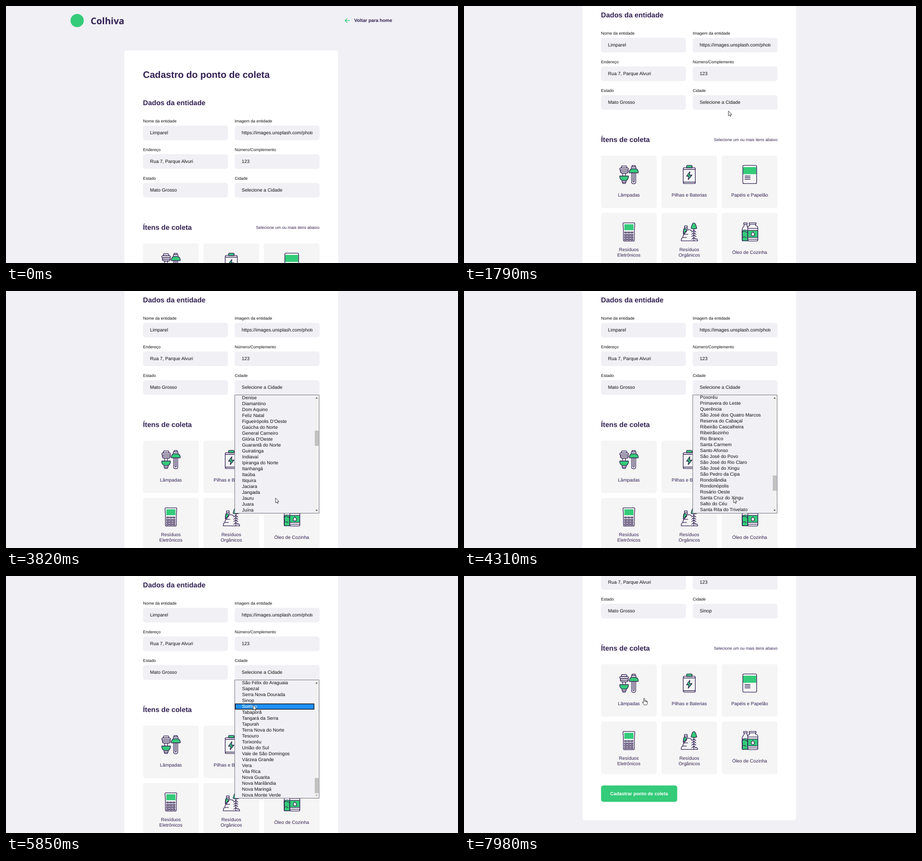
Recreate the animation shown at these times as an HTML page. Size 991 by 565 pixels, loop 8 s.

```html
<!DOCTYPE html>
<html lang="pt-BR">
<head>
<meta charset="utf-8">
<title>Cadastro do ponto de coleta</title>
<style>
  html, body { margin: 0; width: 100%; height: 100%; overflow: hidden; background: #f0f0f5; }
  #stage { display: block; width: 991px; height: 565px; font: 10.29px "Liberation Sans", Arial, sans-serif; text-rendering: geometricPrecision; }
  .title { font-size: 20.58px; font-weight: bold; }
  .head { font-size: 15.43px; font-weight: bold; }
  .small { font-size: 9px; }
  .bold { font-weight: bold; }
  .brand { font: bold 20px "Noto Sans", sans-serif; }
  .ink { fill: #322153; }
  .icon { fill: none; stroke: #322153; stroke-width: 1.35; stroke-linejoin: round; stroke-linecap: round; }
  .icon .g { fill: #34cb79; }
  .icon .w { fill: #f5f5f5; }
  .mid { text-anchor: middle; }
</style>
</head>
<body>
<svg id="stage" viewBox="0 0 991 565">
  <rect width="991" height="565" fill="#f0f0f5"/>
  <g id="page">
    <circle cx="156" cy="32" r="14.5" fill="#34cb79"/>
    <g class="ink">
      <text class="brand" x="185.5" y="40">Colhiva</text>
      <text class="bold" x="763.5" y="35">Voltar para home</text>
    </g>
    <path d="M753.5 32H743.5M748 27.3L743.3 32L748 36.7" fill="none" stroke="#34cb79" stroke-width="1.3"/>
    <rect x="259.5" y="97.5" width="468.5" height="767.5" rx="5" fill="#fff"/>
    <g class="ink">
      <text class="title" x="300.3" y="158">Cadastro do ponto de coleta</text>
      <text class="head" x="300.3" y="218">Dados da entidade</text>
      <text class="head" x="300.3" y="492">Ítens de coleta</text>
      <text class="small" x="687.2" y="490" text-anchor="end">Selecione um ou mais itens abaixo</text>
    </g>
    <g id="fields"></g>
    <g id="items"></g>
    <rect x="300.5" y="788.5" width="167" height="36" rx="5" fill="#34cb79"/>
    <text class="bold mid" x="384" y="810" fill="#fff">Cadastrar ponto de coleta</text>
  </g>
  <g id="popup">
    <rect x="501.5" y="228.5" width="185" height="260" fill="#f0f0f5" stroke="#70707a"/>
    <svg x="502" y="229" width="174" height="259" viewBox="502 229 174 259">
      <g id="rows"></g>
      <g id="mark">
        <rect x="502.8" y="0.8" width="172.6" height="11.6" fill="#1e90ff" stroke="#101010" stroke-width="1.5"/>
        <text id="markText" x="517.6" y="9.7" fill="#fff"></text>
      </g>
    </svg>
    <rect x="676" y="229" width="10" height="259" fill="#f1f1f1"/>
    <rect id="thumb" x="677" width="8.5" height="33.5" fill="#c1c1c1"/>
    <path id="up" d="M678.5 236.5H683.7L681.1 233.6Z"/>
    <path id="down" d="M678.5 481H683.7L681.1 483.9Z"/>
  </g>
  <g id="cursor" fill="#fff" stroke="#222" stroke-width=".9" stroke-linejoin="round">
    <path id="arrow" d="M0 0V10.8L2.5 8.6L4.2 12.2L5.8 11.4L4.2 8H7.5Z"/>
    <path id="hand" d="M-1.2 8V1Q0 -1 1.2 1V5.5Q2.5 4.4 3.4 5.8Q4.6 5 5.3 6.5Q6.8 6 7 7.7V10.5Q7 13 5.5 15H0Q-1.5 12.5 -4 9.6Q-4.5 7 -1.2 9.8ZM1.2 5.5V8M3.4 6V8.5M5.3 6.5V9"/>
  </g>
</svg>
<script>
const $ = id => document.getElementById(id);
const LOOP = 8000, ROW = 12.97, LIST_TOP = 228.5, MAX_SCROLL = 122;

const cities = `Selecione a Cidade,Acorizal,Água Boa,Alta Floresta,Alto Araguaia,Alto Boa Vista,Alto Garças,Alto Paraguai,Alto Taquari,Apiacás,Araguaiana,Araguainha,Araputanga,Arenápolis,Aripuanã,Barão de Melgaço,Barra do Bugres,Barra do Garças,Bom Jesus do Araguaia,Brasnorte,Cáceres,Campinápolis,Campo Novo do Parecis,Campo Verde,Campos de Júlio,Canabrava do Norte,Canarana,Carlinda,Castanheira,Chapada dos Guimarães,Cláudia,Cocalinho,Colíder,Colniza,Comodoro,Confresa,Conquista D'Oeste,Cotriguaçu,Cuiabá,Curvelândia,Denise,Diamantino,Dom Aquino,Feliz Natal,Figueirópolis D'Oeste,Gaúcha do Norte,General Carneiro,Glória D'Oeste,Guarantã do Norte,Guiratinga,Indiavaí,Ipiranga do Norte,Itanhangá,Itaúba,Itiquira,Jaciara,Jangada,Jauru,Juara,Juína,Juruena,Juscimeira,Lambari D'Oeste,Lucas do Rio Verde,Luciara,Vila Bela da Santíssima Trindade,Marcelândia,Matupá,Mirassol d'Oeste,Nobres,Nortelândia,Nossa Senhora do Livramento,Nova Bandeirantes,Nova Nazaré,Nova Lacerda,Nova Santa Helena,Nova Brasilândia,Nova Canaã do Norte,Nova Mutum,Nova Olímpia,Nova Ubiratã,Nova Xavantina,Novo Mundo,Novo Horizonte do Norte,Novo São Joaquim,Paranaíta,Paranatinga,Novo Santo Antônio,Pedra Preta,Peixoto de Azevedo,Planalto da Serra,Poconé,Pontal do Araguaia,Ponte Branca,Pontes e Lacerda,Porto Alegre do Norte,Porto dos Gaúchos,Porto Esperidião,Porto Estrela,Poxoréu,Primavera do Leste,Querência,São José dos Quatro Marcos,Reserva do Cabaçal,Ribeirão Cascalheira,Ribeirãozinho,Rio Branco,Santa Carmem,Santo Afonso,São José do Povo,São José do Rio Claro,São José do Xingu,São Pedro da Cipa,Rondolândia,Rondonópolis,Rosário Oeste,Santa Cruz do Xingu,Salto do Céu,Santa Rita do Trivelato,Santa Terezinha,Santo Antônio do Leste,Santo Antônio do Leverger,São Félix do Araguaia,Sapezal,Serra Nova Dourada,Sinop,Sorriso,Tabaporã,Tangará da Serra,Tapurah,Terra Nova do Norte,Tesouro,Torixoréu,União do Sul,Vale de São Domingos,Várzea Grande,Vera,Vila Rica,Nova Guarita,Nova Marilândia,Nova Maringá,Nova Monte Verde`.split(',');

const fields = [
  ['Nome da entidade', 'Limparel'], ['Imagem da entidade', 'https://images.unsplash.com/photo-1'],
  ['Endereço', 'Rua 7, Parque Alvuri'], ['Número/Complemento', '123'],
  ['Estado', 'Mato Grosso'], ['Cidade', cities[0]]
];
$('fields').innerHTML = fields.map(([label, value], i) => {
  const x = 300.4 + i % 2 * 201, y = 263 + (i >> 1) * 63;
  return `<text class="small" x="${x}" y="${y - 7}" fill="#111">${label}</text>
    <rect x="${x}" y="${y}" width="186" height="32" rx="5" fill="#f0f0f5"/>
    <svg x="${x + 15.4}" y="${y}" width="155.4" height="32"><text id="value${i}" y="19" fill="#111">${value}</text></svg>`;
}).join('');

// Icons use the top centre of their tile as origin.
const keypad = () => {
  let d = '';
  for (let i = 0; i < 12; i++)
    d += `M${-9.3 + i % 3 * 6.8} ${42 + (i / 3 | 0) * 5}h4.6v${i < 3 ? 2 : 2.6}h-4.6z`;
  return d;
};
const items = [
  [['Lâmpadas'], `
    <rect x="-16.5" y="23" width="12" height="4.5" rx="2"/><rect x="-20" y="27.5" width="19" height="4.3" rx="2.1"/>
    <rect x="-18.8" y="31.8" width="17.6" height="4" rx="2"/><path d="M-18.5 35.8Q-18 39 -15 39H-5Q-2 39 -1.5 35.8M-13.5 39V45M-7.5 39V45"/>
    <path class="g" d="M-20 45H-1V48Q-3 55 -7 55H-14Q-18.5 54 -20 48Z"/>
    <path d="M-15 55V58.5H-6V55M-13.5 58.5V61.5H-7.5V58.5"/>
    <path d="M7 25V22H14V25M5.5 29V25H15.5V29M6 38V59Q6 62 10.5 62Q15 62 15 59V38M9 38V57Q10.5 60 12 57V38"/>
    <path class="g" d="M1 38V35Q3 29 7 29H14Q18.5 29 20.5 35V38Z"/>`],
  [['Pilhas e Baterias'], `
    <path class="g" d="M-6 27V24Q-6 21.7 -4 21.7H4Q6.3 21.7 6.3 24V27Z"/>
    <rect x="-13.3" y="26.7" width="26.6" height="35" rx="2.5"/><path d="M-13 30.5H13M-13 58.5H13"/>
    <path class="g" d="M1.2 35.5L-6 45.5H-1.3L-2.3 53L6 43H.7Z"/>`],
  [['Papéis e Papelão'], `
    <rect x="-14.5" y="25.5" width="29" height="15.5" fill="#34cb79" stroke="none"/>
    <rect x="-15" y="21.7" width="30.3" height="40" rx="2.5"/><path d="M-10.5 45H1M-10.5 48.5H1M-10.5 52H1"/>`],
  [['Resíduos', 'Eletrônicos'], `
    <path d="M-11 21.7H11Q13 21.7 13 24L12 36V59Q12 62 9.5 62H-9.5Q-12 62 -12 59V36L-13 24Q-13 21.7 -11 21.7Z"/>
    <rect x="-10" y="25" width="20" height="13" fill="#34cb79" stroke="none"/><path d="${keypad()}"/>`],
  [['Resíduos', 'Orgânicos'], `
    <path class="g" d="M-11.5 35Q-13 37 -13 46L-6 41V35Z"/>
    <path d="M-10.5 32V28.5H-4.5V32ZM-9.5 32Q-12.5 35 -12.5 39V47M-5 32L-3 36"/>
    <path d="M-17.5 61.5Q-18 55 -14 54Q-14 48 -10 47Q-9 37 0 37Q3 37 5 40M-17.5 61.5H18.5Q18.5 57 14 57M-11 47H-3M-14 54H-6"/>
    <path class="g" d="M4 34Q6 22 10 22Q14 22 16.5 34Q10 36.5 4 34Z"/>
    <path d="M10 35V61M5.5 42L10 38.5L14.5 42M5.5 47L10 43.5L14.5 47M5.5 52L10 48.5L14.5 52M5.5 58L10 54L14.5 58"/>`],
  [['Óleo de Cozinha'], `
    <path class="g" d="M-15.5 39Q-11 36 -4 39V61.5H-15Q-17 60 -16 53Q-17.5 48 -15.5 39Z"/>
    <path d="M-13 25V21.7H-5.5V25ZM-12 25V28Q-17 34 -16.5 40Q-17.5 45 -15.5 49Q-17.5 56 -16 61.5H-3M-6 25V28L-3.5 33"/>
    <path class="w" d="M-1 25V21.7H14V25ZM0 25V28Q-4 29 -4 33V58.5Q-4 61.7 -1 61.7H15Q18 61.7 18 58.5V33Q18 29 13 28V25Z"/>
    <path class="g" d="M-4 38.5H18V54H-4Z"/><path d="M-4 34H18M-4 58H18M-16 42Q-12 39 -8 42L-4 43M-16 54Q-12 51 -8 54"/>
    <path class="w" d="M7 41.5Q3.5 45.5 3.5 47.5Q3.5 50.5 7 50.5Q10.5 50.5 10.5 47.5Q10.5 45.5 7 41.5Z"/>`]
];
$('items').innerHTML = items.map(([lines, art], i) => {
  const x = 361.5 + i % 3 * 132.4, y = 521.7 + (i / 3 | 0) * 126.2;
  const first = lines.length > 1 ? 84.3 : 90.2;
  return `<g transform="translate(${x} ${y})"><rect x="-61" width="122" height="115.5" rx="5" fill="#f5f5f5"/>
    <g class="icon">${art}</g>
    ${lines.map((line, n) => `<text class="ink mid" y="${first + n * 11.8}">${line}</text>`).join('')}</g>`;
}).join('');

$('rows').innerHTML = cities.map((name, i) =>
  `<text x="517.6" y="${LIST_TOP + i * ROW + 9.7}" fill="#111">${name}</text>`).join('');

// Held values: [time, value]
const pageScroll = [[0, 0], [1010, 64], [1100, 129], [1250, 193], [6860, 321.4], [7100, 328]];
const listScroll = [[0, 0], [3270, 15], [3340, 24.62], [3820, 40], [3890, 50], [4220, 75], [4310, 99.07], [4360, 114], [4440, MAX_SCROLL]];
const popupAlpha = [[0, 0], [2250, .6], [2330, 1], [6260, .4], [6330, 0]];
const markShown = [[0, 1], [3270, 0], [3570, 1], [3820, 0], [4920, 1]];
const held = (track, t) => track.findLast(([time]) => time <= t)[1];

// Pointer moves: [start, last step, steps, x, y]
const moves = [
  [170, 780, 9, 572, 321], [1480, 2020, 8, 581, 216], [2870, 3110, 4, 591, 455],
  [4920, 4990, 2, 591, 440], [5320, 6010, 10, 540, 277.5], [7260, 7380, 2, 472, 264.5], [7580, 7730, 3, 395, 268.5]
];
function pointer(t) {
  let x = 928, y = 526;
  for (const [start, end, steps, toX, toY] of moves) {
    if (t < start) break;
    const step = Math.floor((t - start) / (end - start) * (steps - 1) + .1) + 1;
    const eased = 1 - (1 - Math.min(1, step / steps)) ** 2;
    x += (toX - x) * eased;
    y += (toY - y) * eased;
  }
  return [x, y];
}

const move = (id, x, y) => $(id).setAttribute('transform', `translate(${x} ${y})`);
const show = (id, on) => $(id).style.display = on ? '' : 'none';

function draw(t) {
  const [x, y] = pointer(t), scroll = held(listScroll, t);
  move('page', 0, -held(pageScroll, t));
  $('value5').textContent = t < 6260 ? cities[0] : 'Sinop';

  $('popup').style.opacity = held(popupAlpha, t);
  move('rows', 0, -scroll * ROW);
  const hovered = Math.max(0, Math.floor(scroll + (y - LIST_TOP) / ROW));
  show('mark', held(markShown, t));
  move('mark', 0, LIST_TOP + (hovered - scroll) * ROW);
  $('markText').textContent = cities[hovered];
  $('thumb').setAttribute('y', 239.8 + scroll / MAX_SCROLL * 204.2);
  $('up').setAttribute('fill', scroll > 0 ? '#505050' : '#a3a3a3');
  $('down').setAttribute('fill', scroll < MAX_SCROLL ? '#505050' : '#a3a3a3');

  show('cursor', t >= 170);
  move('cursor', x, y);
  show('arrow', t < 7260);
  show('hand', t >= 7260);
}

function tick() {
  draw(performance.now() % LOOP);
  requestAnimationFrame(tick);
}
tick();
</script>
</body>
</html>
```
